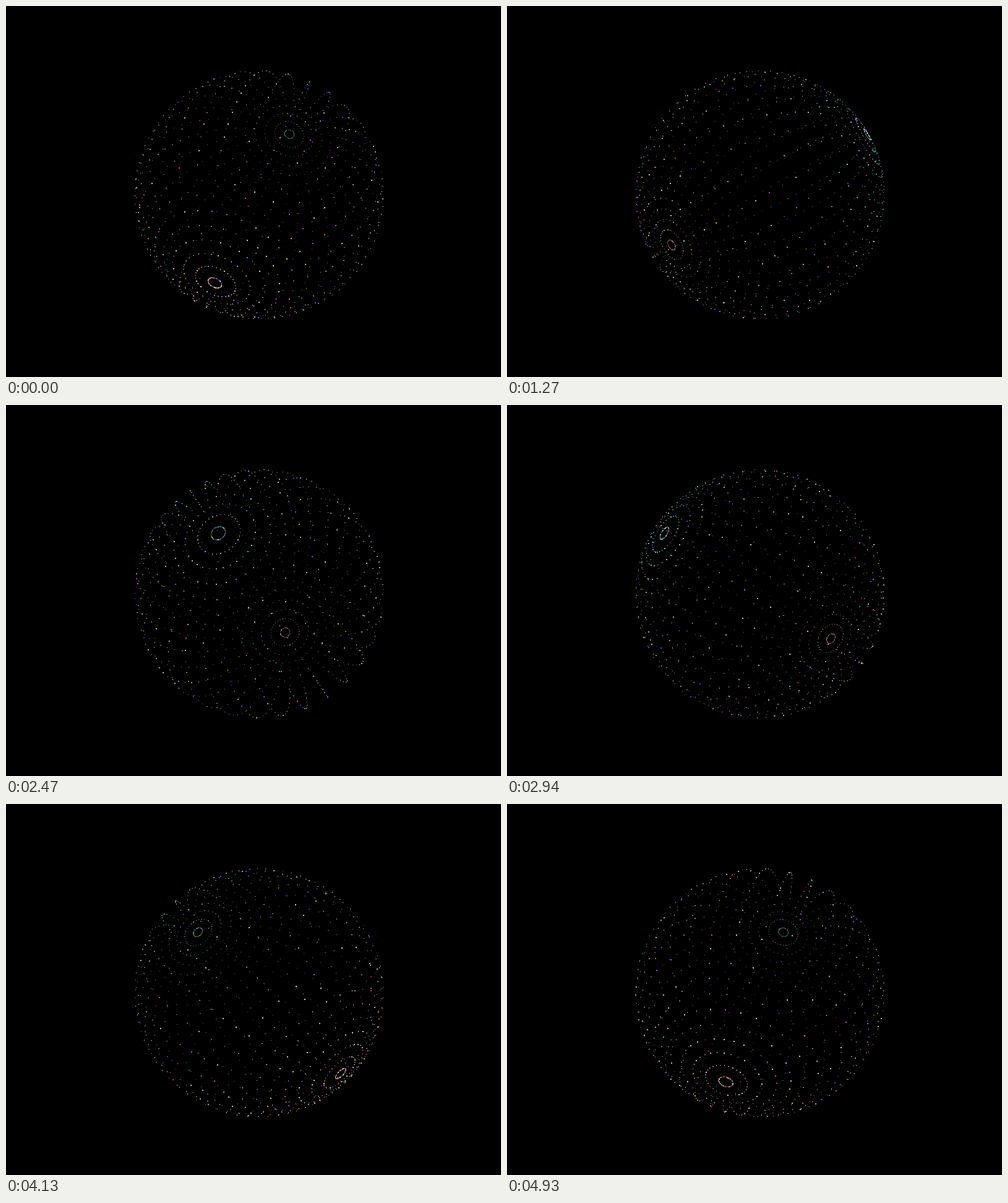
Animation of 800 by 600 pixels, one loop 5 s. Source, as an HTML page with a canvas:

```html
<!DOCTYPE html>
<html>
<head>
<meta charset="utf-8">
<title>Dotted sphere</title>
<style>
html, body { margin: 0; width: 100%; height: 100%; overflow: hidden; background: #000; }
canvas { display: block; }
</style>
</head>
<body>
<canvas id="stage" width="800" height="600"></canvas>
<script>
const ctx = document.getElementById('stage').getContext('2d');
const LOOP = 5000, STEPS = 75, START = 0.353;
const CX = 409, CY = 305.3, FOCAL = 778, DIST = 4;
const CAM_SIN = 0.125, CAM_COS = Math.sqrt(1 - CAM_SIN ** 2);
const TILT_SIN = Math.sin(Math.PI / 3), TILT_COS = 0.5;
const COUNT = 32;

let seed = 7;
function random() {
  seed = (seed * 1664525 + 1013904223) % 4294967296;
  return seed / 4294967296;
}

// Cool tints gather near the upper pole, warm ones near the lower pole.
function tint(warmth) {
  const warm = random() < warmth;
  if (random() < 0.6) return warm ? [225, 215, 200] : [165, 200, 185];
  const hues = warm
    ? [[225, 95, 95], [235, 160, 110], [190, 80, 200], [135, 130, 235]]
    : [[65, 200, 130], [65, 200, 130], [95, 100, 220], [120, 185, 215]];
  return hues[Math.floor(random() * hues.length)];
}

const dots = [];
for (let i = 0; i < COUNT; i++) {
  const polar = (i + 0.5) * Math.PI / COUNT;
  for (let j = 0; j < COUNT; j++) {
    const around = (j + 0.5) * 2 * Math.PI / COUNT;
    const a = Math.cos(polar);
    const b = Math.sin(polar) * Math.cos(around);
    dots.push({
      out: TILT_SIN * a - TILT_COS * b,
      up: TILT_COS * a + TILT_SIN * b,
      side: Math.sin(polar) * Math.sin(around),
      color: tint((1 - a) / 2)
    });
  }
}

function draw(angle) {
  const s = Math.sin(angle), c = Math.cos(angle);
  ctx.fillStyle = '#000';
  ctx.fillRect(0, 0, 800, 600);
  for (const { out, up, side, color } of dots) {
    const x = out * s + side * c;
    const z = side * s - out * c;
    const near = up * CAM_SIN + z * CAM_COS;
    const scale = FOCAL / (DIST - near);
    const size = 1.35 + 0.25 * near;
    const left = CX + x * scale - size / 2;
    const top = CY - (up * CAM_COS - z * CAM_SIN) * scale - size / 2;
    const px = Math.round(left), py = Math.round(top);
    const light = 0.75 + 0.2 * near;
    ctx.fillStyle = `rgb(${color.map(v => Math.round(v * light)).join()})`;
    ctx.fillRect(px, py, Math.round(left + size) - px, Math.round(top + size) - py);
  }
}

const begin = performance.now();
function tick() {
  const time = (performance.now() - begin) % LOOP;
  const step = Math.floor((time + 7) * STEPS / LOOP);
  draw(START + step * 2 * Math.PI / STEPS);
  requestAnimationFrame(tick);
}
tick();
</script>
</body>
</html>
```
